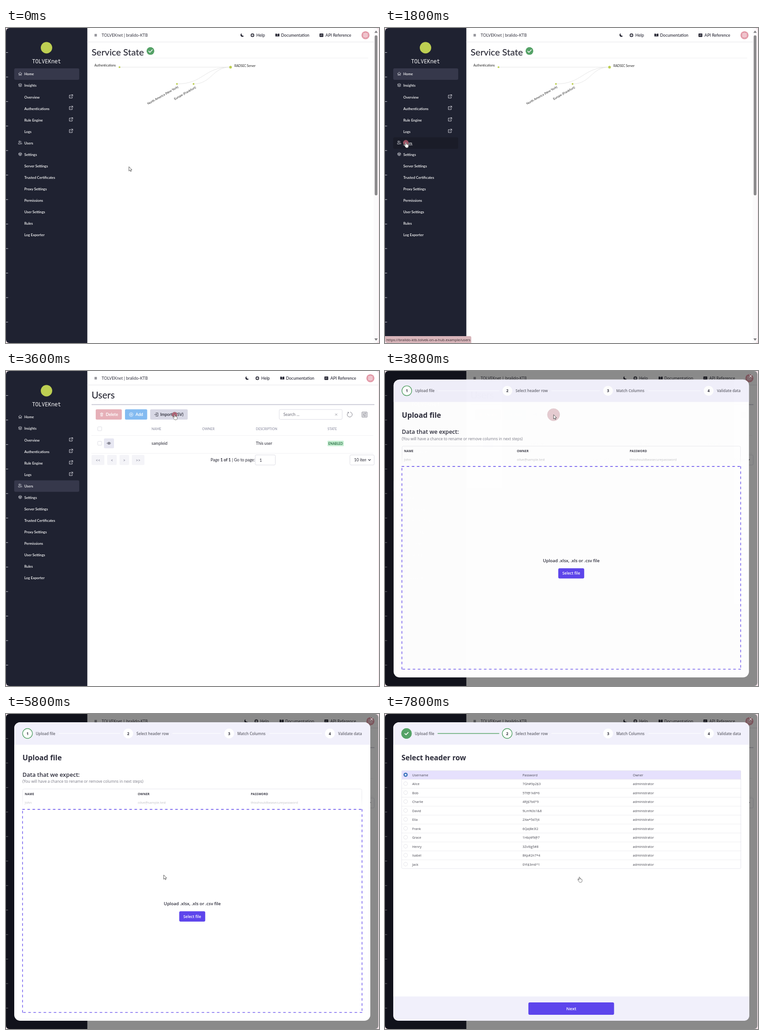
An HTML page for the animation above (8 s loop, 815 by 687 pixels).

```html
<!DOCTYPE html>
<html lang="en">
<head>
<meta charset="utf-8">
<title>User import walkthrough</title>
<style>
  html, body { margin: 0; height: 100%; overflow: hidden; background: #f5e4ea; }
  svg { display: block; }
  #stage { width: 100%; height: 100%; }
  text { font-family: Lato, sans-serif; white-space: pre; }
  .ui text, text.ui { font-family: "Open Sans", "Noto Sans", sans-serif; }
  text.mono { font-family: "Noto Sans Mono", monospace; }
  .line { fill: none; stroke-linecap: round; stroke-linejoin: round; }
</style>
</head>
<body>
<svg id="stage" viewBox="0 0 815 687"></svg>
<script>
const LOOP = 8000, STEP = 200;
const INK = '#262633', GREEN = '#55a267', VIOLET = '#5d45ec', LIME = '#bdcf52';

const text = (x, cy, s, size, fill = INK, attrs = '') =>
  `<text x="${x}" y="${cy + size * 0.355}" font-size="${size}" fill="${fill}" ${attrs}>${s}</text>`;
const rect = (x, y, x2, y2, fill, r = 0, attrs = '') =>
  `<rect x="${x}" y="${y}" width="${x2 - x}" height="${y2 - y}" rx="${r}" fill="${fill}" ${attrs}/>`;
const circle = (x, y, r, fill, attrs = '') =>
  `<circle cx="${x}" cy="${y}" r="${r}" fill="${fill}" ${attrs}/>`;
const line = (d, stroke, width = 1, attrs = '') =>
  `<path class="line" d="${d}" stroke="${stroke}" stroke-width="${width}" ${attrs}/>`;
const group = (id, body, attrs = '') => `<g id="${id}" ${attrs}>${body}</g>`;
const at = (x, y, body) => `<g transform="translate(${x} ${y})">${body}</g>`;
const weight = w => `font-weight="${w}"`;
const MIDDLE = 'text-anchor="middle"', END = 'text-anchor="end"';

function sidebar() {
  const items = ['Home', 'Insights', 'Overview', 'Authentications', 'Rule Engine', 'Logs', 'Users', 'Settings',
    'Server Settings', 'Trusted Certificates', 'Proxy Settings', 'Permissions', 'User Settings', 'Rules', 'Log Exporter'];
  const icons = {
    0: 'M-3.5 0L0-3.5L3.5 0M-2.6-.6V3.5H-.8V1H.8V3.5H2.6V-.6',
    1: 'M-3.5-2L0-3.6L3.5-2L0-.4ZM-3.5 0L0 1.6L3.5 0M-3.5 1.9L0 3.5L3.5 1.9',
    6: 'M-3 -2.5a1.4 1.4 0 1 0 2.8 0a1.4 1.4 0 1 0-2.8 0M-3.8 2.8V1.2L-2.6 0H-.6L.6 1.2V2.8ZM1-3.5A1.4 1.4 0 0 1 1-.9M1.8 .2L3.6 1.4V2.8H2',
    7: 'M-3.4 0a3.4 3.4 0 1 0 6.8 0a3.4 3.4 0 1 0-6.8 0M-1.1 0a1.1 1.1 0 1 0 2.2 0a1.1 1.1 0 1 0-2.2 0M-3-1L-1-.4M3-1L1-.4M0 1V3'
  };
  let s = `<path d="M177.7 0V687H7Q0 687 0 680V7Q0 0 7 0Z" fill="#1f2231"/>`;
  for (let i = 1; i <= 12; i++) s += rect(0, i * 53.45 - .5, 4.5, i * 53.45 + .5, '#c9cad2');
  s += circle(88.5, 43, 12.5, LIME) + text(88.5, 72.5, 'TOLVEKnet', 11.7, '#fff', MIDDLE + ' class="mono"');
  s += rect(18, 88, 160, 113, '#36384b', 3, 'id="active"');
  s += rect(18, 238.5, 160, 263.5, '#1a1c28', 3, 'id="hover"');
  items.forEach((name, i) => {
    const y = 100.6 + i * 25.07;
    s += text(40, y, name, 7.8, '#fff', weight(600));
    if (icons[i]) s += at(31, y - 1, line(icons[i], '#dcdde4', .8));
    if (i > 1 && i < 6) s += at(142, y - 1.5, line('M-.5-2.8H-3.6V3.6H2.8V.6M.8-3.8H3.8V-.8M3.6-3.6L-.8 .8', '#e6e6ec', .9));
  });
  return s + line('M40 255.2H59.8', '#fff', .7, 'id="underline"');
}

// The links are laid out from the right, so a wider font pushes the left ones further out.
function links(size, helpShift, docShift) {
  return at(-helpShift, 0, at(516, 15.5, `<path d="M-1-4A4 4 0 1 0 4 1.4A4 4 0 0 1-1-4Z" fill="${INK}"/>`)
      + at(538.5, 15.8, circle(0, 0, 3.2, 'none', `stroke="${INK}" stroke-width="1.5"`)
        + line('M-2.7-2.7L2.7 2.7M2.7-2.7L-2.7 2.7', INK, 1.1) + circle(0, 0, 1.2, '#fff'))
      + text(547, 15.8, 'Help', size, INK, weight(500)))
    + at(-docShift, 0, at(593, 15.5, `<path d="M-4.4-3Q-2-3.6-.4-2.6V3.4Q-2 2.4-4.4 3ZM4.4-3Q2-3.6 .4-2.6V3.4Q2 2.4 4.4 3Z" fill="${INK}"/>`)
      + text(601, 15.8, 'Documentation', size, INK, weight(500)))
    + rect(685, 12, 693.4, 19.4, INK, .8) + text(689.2, 15.7, 'API', 3.2, '#fff', MIDDLE)
    + text(698, 15.8, 'API Reference', size, INK, weight(500));
}

function header() {
  const avatar = circle(785.5, 15.7, 8.8, '#e39aa8')
    + at(785.5, 15.7, line('M0-5.5V5.5M-5.5 0H5.5M-3-4.5V4.5M3-4.5V4.5M-4.5-3H4.5M-4.5 3H4.5', '#fbeef1', .9));
  const title = size => text(209, 15.8, 'TOLVEKnet | bralido-KTB', size, '#33333f');
  return line('M178 30.5H813', '#e6e6ea')
    + line('M193.8 13.8H198.2M193.8 15.7H198.2M193.8 17.6H198.2', INK, .9)
    + group('plainTitle', title(9)) + group('modalTitle', title(8.7), 'class="ui"')
    + group('menu', group('plainLinks', links(9, 0, 0)) + group('modalLinks', links(8.7, 2.3, 1.5), 'class="ui"') + avatar);
}

function homePage() {
  const label = (x, y, s) => `<text transform="translate(${x} ${y}) rotate(-29.5)" font-size="6.7" fill="#222" ${END}>${s}</text>`;
  return text(187, 52.8, 'Service State', 20, INK, weight(500))
    + circle(315.6, 50.2, 8.4, GREEN) + line('M311.8 50.4L314.6 53.1L319.7 47.6', '#fff', 1.5)
    + line('M187 65.5H791', '#eeeef1')
    + line('M248 85.3H490M373.5 122C432 122 432 85.3 490 85.3M410 122C450 122 450 85.3 490 85.3', '#e2e2e2', .9)
    + circle(248, 85.4, 1.9, LIME) + circle(490.6, 85.4, 2.9, LIME)
    + circle(373.5, 122, 1.9, LIME) + circle(409.8, 122, 1.9, LIME)
    + text(240, 81.5, 'Authentications', 6.7, '#222', END) + text(499, 83, 'RADSEC Server', 6.7, '#222')
    + label(377, 130, 'North America (New York)') + label(415.5, 131, 'Europe (Frankfurt)')
    + rect(803.5, 0, 813, 687, '#fbfafb')
    + rect(805.6, 16, 811.6, 365, '#8b8a8c', 3)
    + '<path d="M805 10.5L808.6 5.5L812.2 10.5ZM805 677L808.6 682L812.2 677Z" fill="#7c7b7e"/>';
}

function usersPage() {
  const box = 'stroke="#dcdce4" stroke-width="1"';
  const pager = [[187, 215, '&lt;&lt;'], [221, 242, '&lt;'], [248, 269, '&gt;'], [275, 302.5, '&gt;&gt;']];
  const heads = [[318, 'NAME'], [428.5, 'OWNER'], [546, 'DESCRIPTION'], [702.5, 'STATE']];
  let s = text(187, 52.8, 'Users', 20.4, INK, weight(500)) + rect(187, 72.4, 805, 74.2, '#c8c8d4')
    + rect(196, 83.5, 253, 106, '#e6b0b8', 2.5) + text(218, 95, 'Delete', 9, '#fff', weight(700))
    + at(209, 95, line('M-3-2.5H3M-1-2.5V-3.7H1V-2.5M-2.3-2.5L-1.9 3.5H1.9L2.3-2.5M-.7-.8V2M.7-.8V2', '#fff', .8))
    + rect(260, 83.5, 308.5, 106, '#84bbf1', 2.5) + text(283, 95, 'Add', 9, '#fff', weight(700))
    + circle(273.5, 95, 4, 'none', 'stroke="#fff" stroke-width=".8"') + line('M271.5 95H275.5M273.5 93V97', '#fff', .8)
    + rect(315, 83.5, 397, 106, '#d8d8e5', 2.5) + text(337, 95, 'Import (CSV)', 9, INK, weight(600))
    + at(328.5, 95, line('M-1-3.5H3.5V3.5H-1M-4 0H1M-.8-1.8L1 0L-.8 1.8', INK, .8))
    + rect(597, 84, 734.5, 105.5, '#fff', 2.5, box) + text(606, 95, 'Search ...', 9, '#6c6c78')
    + line('M719.5 93L723.5 97M723.5 93L719.5 97', '#85858f', .8)
    + line('M748 90.3A5.5 5.5 0 1 0 752.5 89.6M746.6 90H748.6V92', '#6f6f7b', .9)
    + rect(777.8, 89.5, 789, 100.7, 'none', .5, 'stroke="#6f6f7b" stroke-width=".9"')
    + line('M779.5 92.3H787.3M779.5 95.1H787.3M779.5 97.9H787.3M785 91.3V93.3M781.5 94.1V96.1M784 96.9V98.9', '#6f6f7b', .9)
    + line('M187 140.5H802M187 179.5H802', '#f0f0f3', .9);
  for (const y of [126, 157.6]) s += rect(200.5, y - 4.2, 209, y + 4.2, '#fff', 1, box);
  for (const [x, name] of heads) s += text(x, 126, name, 7.1, '#a2a3b3', weight(700));
  s += rect(214, 147, 236, 168.5, '#e7e7f2', 2.5)
    + line('M221 157.6Q225 152.8 229 157.6Q225 162.4 221 157.6Z', INK, .8) + circle(225, 157.6, 1.2, INK)
    + text(318, 158, 'sampleid', 9) + text(546, 158, 'This user', 9)
    + rect(702.5, 152, 738, 164, '#c8f0d4', 1.5) + text(720.2, 158.1, 'ENABLED', 7, '#2a7146', MIDDLE + weight(700));
  for (const [a, b, sign] of pager)
    s += rect(a, 183, b, 205, '#f4f4f8', 2.5) + text((a + b) / 2, 194.5, sign, 8.5, '#9a9aaa', MIDDLE + weight(700));
  return s + text(447, 194, 'Page <tspan font-weight="700">1 of 1</tspan> | Go to page:', 9)
    + rect(544.5, 183, 588.5, 205, '#fff', 2.5, box) + text(554, 194.5, '1', 9)
    + rect(751.5, 183, 804.5, 205, '#fff', 2.5, box)
    + `<svg x="760" y="183" width="27" height="22">${text(.5, 11, '10 items', 9)}</svg>`
    + line('M791.8 192.8L794.2 195.2L796.6 192.8', INK, 1.2);
}

function uploadPane() {
  const columns = [[41, 'NAME', 'John'], [288, 'OWNER', 'olive@sample.test'], [535, 'PASSWORD', 'thisshouldbeasecurepassword']];
  // Four separate sides, so that the dashes start anew at each corner.
  const dashes = 'M36.2 651.3V207.5M35.6 208H778.4M777.9 207.5V651.3M778.4 650.9H35.6';
  let s = text(36, 95.8, 'Upload file', 15.9, '#2c2c3a', weight(700))
    + text(36, 132.3, 'Data that we expect:', 12.6, '#2c2c3a', weight(600))
    + text(36, 147.5, '(You will have a chance to rename or remove columns in next steps)', 8.4, '#7a7a86')
    + rect(36.5, 163.5, 777.5, 205, 'none', 3, 'stroke="#e9e9ee"');
  for (const [x, name, sample] of columns)
    s += text(x, 174.6, name, 6.5, '#3a3a46', weight(700) + ' letter-spacing=".25"') + text(x, 193, sample, 7.25, '#85858c');
  return s + rect(35.5, 182, 778.5, 206, 'url(#fade)')
    + `<path d="${dashes}" fill="none" stroke="${VIOLET}" stroke-width="1.3" stroke-dasharray="5.57"/>`
    + group('choose', text(407, 414, 'Upload .xlsx, .xls or .csv file', 9.5, '#2c2c3a', MIDDLE + weight(600))
      + rect(378.5, 430.3, 435.3, 452.7, VIOLET, 3) + text(406.9, 441.6, 'Select file', 8.4, '#fff', MIDDLE + weight(600)))
    + group('processing', text(407, 430, 'Processing...', 9.4, '#2c2c3a', MIDDLE + weight(600)));
}

function headerRowPane() {
  const rows = [['Username', 'Password', 'Owner'], ['Alice', '7Gh#9p2$3'], ['Bob', '5Tf@1k8*6'], ['Charlie', '4Rj$7b6^9'],
    ['David', '9Lm%3s1&amp;8'], ['Ella', '2Xw*5d7(4'], ['Frank', '6Qa)8e3!2'], ['Grace', '1Hb(4f9@7'],
    ['Henry', '3Zv!6g5#8'], ['Isabel', '8Kp#2n7*4'], ['Jack', '0Yt$3m6^1']];
  let s = text(36, 95.8, 'Select header row', 15.8, '#2c2c3a', weight(700)) + rect(36, 123, 778, 142.5, '#e6e1fd', 2);
  rows.forEach(([name, password, owner = 'administrator'], i) => {
    const y = 133 + i * 19.5;
    if (i) s += line(`M36 ${y - 10}H778`, '#ebebef', .9);
    s += i ? circle(45, y - .6, 4.2, '#fff', 'stroke="#dfdfe5" stroke-width=".9"')
      : circle(45, y - .5, 4.6, '#3d74bd') + circle(45, y - .5, 1.9, '#fff');
    s += text(59.5, y, name, 7.25, '#45454f') + text(300.5, y, password, 7.25, '#45454f') + text(541.5, y, owner, 7.25, '#45454f');
  });
  return s + rect(36.5, 123.5, 777.5, 337, 'none', 2, 'stroke="#e6e6ec" stroke-width=".9"')
    + '<path d="M18 616H796V656Q796 669 783 669H31Q18 669 18 656Z" fill="#f1f0fb"/>'
    + rect(313.3, 629, 500.5, 656, VIOLET, 3) + text(407, 642.6, 'Next', 9.7, '#fff', MIDDLE + weight(600));
}

function modal() {
  const steps = [[47, 65, 'Upload file'], [267, 285, 'Select header row'], [487.5, 505.5, 'Match Columns'], [707.7, 725.8, 'Validate data']];
  let s = rect(18, 18, 796, 669, '#fff', 13) + '<path d="M18 67V31A13 13 0 0 1 31 18H783A13 13 0 0 1 796 31V67Z" fill="#f1f0fb"/>'
    + line('M115.5 42.5H249M364 42.5H469M576 42.5H690', '#fbfbff', 1.3);
  steps.forEach(([cx, x, name], i) => {
    s += circle(cx, 42.5, 10.7, '#fff', `id="step${i}" stroke-width="1.4"`)
      + text(cx, 42.7, i + 1, 8.2, '#2c2c3a', MIDDLE + weight(700)) + text(x, 42.7, name, 8.2, '#65656f', weight(600));
  });
  return s + group('stepDone', circle(47, 42.5, 11.2, GREEN) + line('M43.4 42.8L46 45.2L50.8 40.2', '#fff', 1.8))
    + line('', GREEN, 1.5, 'id="progress"') + group('uploadPane', uploadPane()) + group('headerRowPane', headerRowPane());
}

const stage = document.getElementById('stage');
stage.innerHTML = `<defs><linearGradient id="fade" x2="0" y2="1">
    <stop offset="0" stop-color="#fff" stop-opacity="0"/><stop offset=".95" stop-color="#fff"/></linearGradient>
    <clipPath id="frame">${rect(0, 0, 813.6, 687, '#fff', 7)}</clipPath></defs>`
  + `<g clip-path="url(#frame)">`
  + rect(0, 0, 814, 687, '#fff') + sidebar() + header() + group('homePage', homePage()) + group('usersPage', usersPage())
  + group('status', rect(-3, 672, 188.5, 690, '#d8b5ba', 3)
    + text(3, 679.8, 'https://bralido-ktb.tolvek-on-a-hub.example/users', 7.9, '#33282c', 'class="ui"'))
  + group('shade', rect(0, 0, 814, 687, '#000', 0, 'opacity=".46"') + line('M796.5 8.5L801.5 13.5M801.5 8.5L796.5 13.5', '#f4f4f4', 1))
  + group('modal', modal(), 'class="ui"') + '</g>'
  + circle(0, 0, 6, '#b0596c', 'id="ripple" stroke="#96505a" stroke-width=".8"')
  + group('cursor', '<path id="arrow" d="M0 0V9.4L2.2 7.4L3.7 10.6L5.2 9.9L3.7 6.8H6.6Z" fill="#fff" stroke="#333" stroke-width=".8"/>'
    + '<path id="hand" d="M-1 .9Q-1-.5 0-.5Q1-.5 1 .9V3.8Q2-.1 2.8 4.2Q4 3.2 4.4 4.8Q5.8 4 5.8 5.6V8Q5.8 10.8 3.6 11.2H.8Q-.6 10.8-1.6 8.6L-3.4 6.2Q-3-.1-1 6.4Z" fill="#fff" stroke="#444" stroke-width=".7" stroke-linejoin="round"/>');

const el = id => document.getElementById(id);
const show = (id, on) => el(id).setAttribute('display', on ? 'inline' : 'none');
const clamp = v => Math.min(1, Math.max(0, v));
const ease = v => v * v * (3 - 2 * v);

// start, end, from, to
const moves = [
  [0, 1200, [268.6, 302.5], [45.5, 250]],
  [2400, 3400, [45.5, 250], [368.3, 95.3]],
  [3800, 4600, [368.3, 95.3], [407, 441]],
  [5600, 5800, [407, 441], [344.6, 351]],
  [5800, 6400, [344.6, 351], [424.8, 356]]
];
const clicks = [1800, 3600, 4800];

function pointer(t) {
  const [start, end, from, to] = moves.filter(m => t >= m[0]).pop();
  const k = ease(clamp((t - start) / (end - start)));
  return from.map((v, i) => v + (to[i] - v) * k);
}

function draw(t) {
  const [x, y] = pointer(t);
  const onUsers = t >= 2000, open = t >= 3800, processing = t >= 7000, second = t >= 7400;
  const overItem = x < 160 && y > 238 && y < 263.5;
  const overImport = !open && onUsers && x > 315 && x < 397 && y < 106;
  const overButton = open && x > 378 && x < 436 && y > 430 && y < 453;

  show('homePage', !onUsers);
  show('usersPage', onUsers);
  el('menu').setAttribute('transform', `translate(${onUsers ? 10.7 : 0} 0)`);
  el('active').setAttribute('y', onUsers ? 238.5 : 88);
  show('hover', overItem && !onUsers);
  show('underline', overItem);
  show('status', overItem);

  for (const part of ['Title', 'Links']) {
    show('plain' + part, !open);
    show('modal' + part, open);
  }
  show('shade', open);
  show('modal', open);
  const settling = t < 4000;
  el('modal').setAttribute('opacity', settling ? .99 : 1);
  el('modal').setAttribute('transform', `translate(407 343.5) scale(${settling ? .998 : 1}) translate(-407 -343.5)`);
  show('choose', !processing);
  show('processing', processing);
  show('uploadPane', !second);
  show('headerRowPane', second);
  show('stepDone', second);
  el('step0').setAttribute('stroke', GREEN);
  el('step1').setAttribute('stroke', second ? GREEN : 'none');
  show('progress', second);
  el('progress').setAttribute('d', `M115.5 42.5H${115.5 + 133.5 * clamp((t - 7400) / 300)}`);

  const hand = overItem || overImport || overButton || processing;
  show('hand', hand);
  show('arrow', !hand);
  el('cursor').setAttribute('transform', `translate(${x} ${y})`);

  const age = Math.min(...clicks.map(c => t >= c ? t - c : Infinity));
  show('ripple', age < 400);
  if (age < 400) {
    const k = age / 200;
    const ripple = el('ripple');
    ripple.setAttribute('cx', x);
    ripple.setAttribute('cy', y);
    ripple.setAttribute('r', 5.6 + 7.8 * k);
    ripple.setAttribute('opacity', .85 - .55 * k);
  }
}

// The picture advances in fixed steps.
function tick() {
  draw(Math.floor(performance.now() % LOOP / STEP) * STEP);
  requestAnimationFrame(tick);
}
tick();
</script>
</body>
</html>
```
